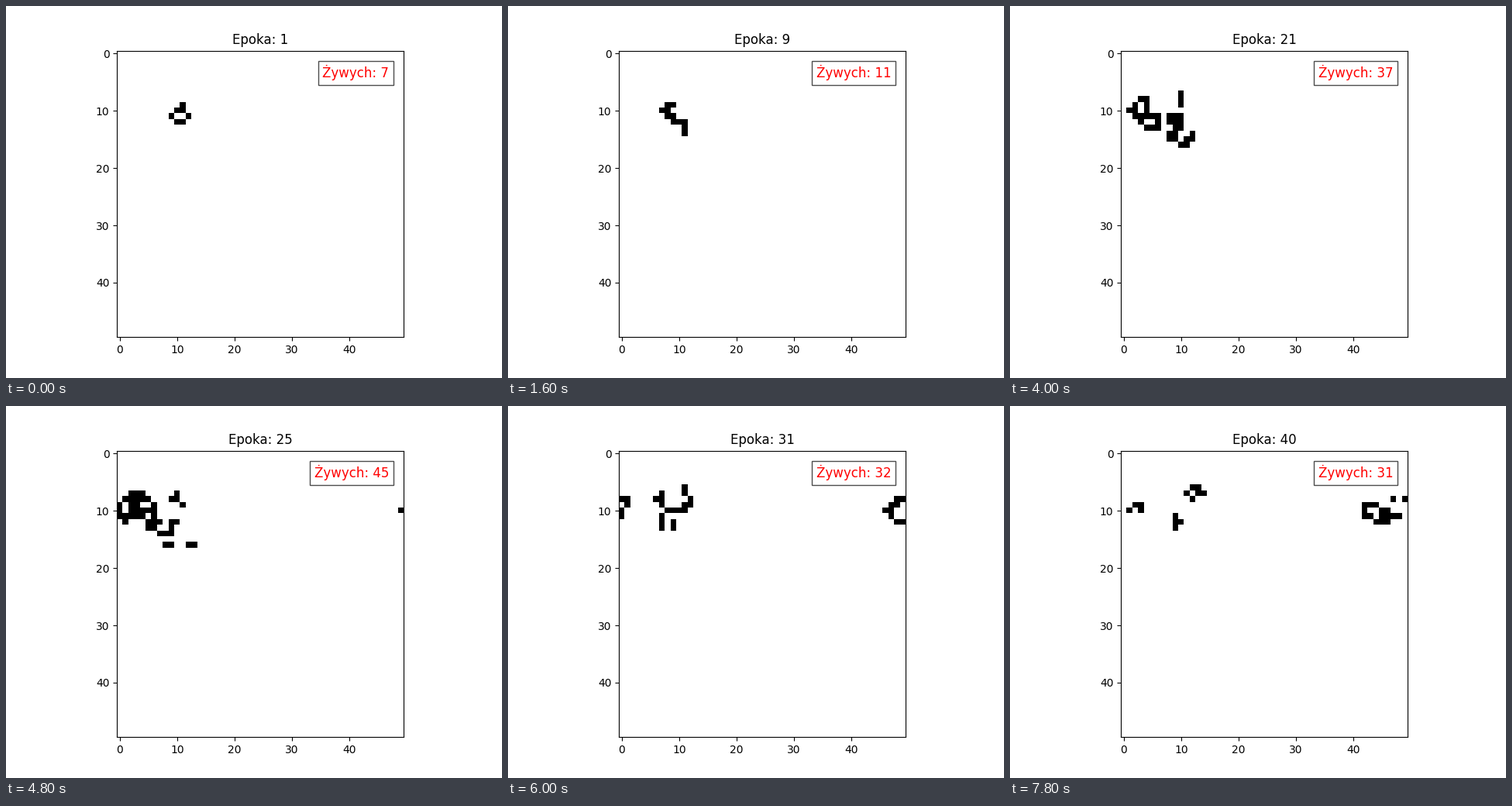
Animation, 640 px wide and 480 px high, one loop 8 s. Source, as a matplotlib script:

```python
import numpy as np
import matplotlib.pyplot as plt
from matplotlib.animation import FuncAnimation

SIZE = 50
EPOCHS = 40


def step(grid):
    """One Game of Life generation on a torus."""
    shifts = [(dy, dx) for dy in (-1, 0, 1) for dx in (-1, 0, 1) if dy or dx]
    near = sum(np.roll(grid, s, axis=(0, 1)) for s in shifts)
    return ((near == 3) | ((grid == 1) & (near == 2))).astype(int)


def history():
    # R-pentomino; the first shown epoch is its second generation
    grid = np.zeros((SIZE, SIZE), dtype=int)
    for y, x in [(10, 11), (10, 12), (11, 10), (11, 11), (12, 11)]:
        grid[y, x] = 1
    grid = step(step(grid))
    grids = [grid]
    while len(grids) < EPOCHS:
        grids.append(step(grids[-1]))
    return grids


grids = history()

fig, ax = plt.subplots(figsize=(6.4, 4.8), dpi=100)
image = ax.imshow(grids[0], cmap="binary", vmin=0, vmax=1)
title = ax.set_title("")
label = ax.text(0.95, 0.95, "", transform=ax.transAxes, color="red",
                fontsize=12, ha="right", va="top",
                bbox=dict(facecolor="white", alpha=0.7))


def update(i):
    image.set_data(grids[i])
    title.set_text(f"Epoka: {i + 1}")
    label.set_text(f"Żywych: {grids[i].sum()}")
    return image, title, label


anim = FuncAnimation(fig, update, frames=EPOCHS, interval=200,
                     repeat=True, repeat_delay=0, blit=False)
plt.show()
```
